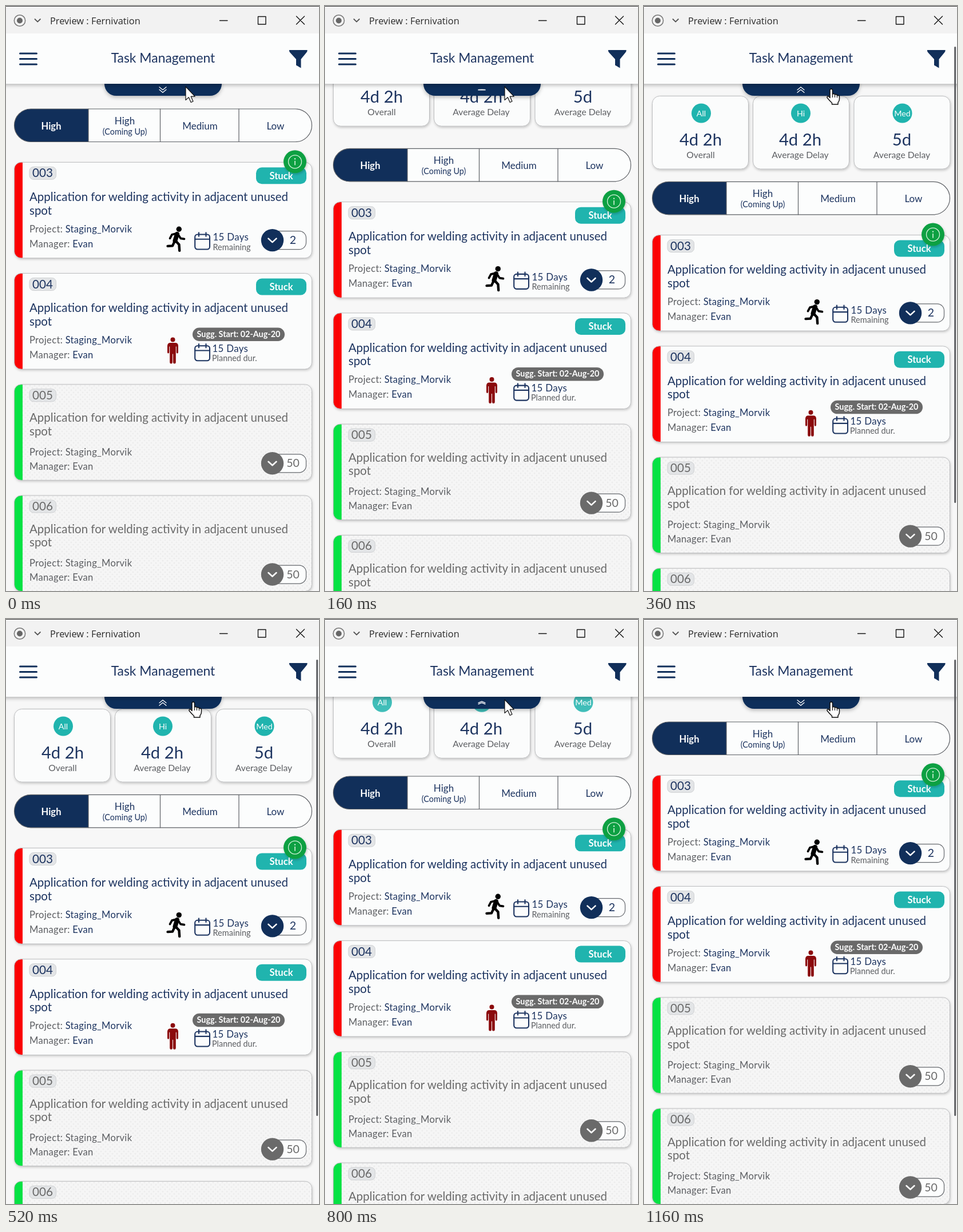
These frames come from a looping animation (547x1023 px, 1200 ms). An HTML page:

```html
<!DOCTYPE html>
<html lang="en">
<head>
<meta charset="utf-8">
<title>Task Management</title>
<style>
  html, body { margin: 0; width: 100%; height: 100%; overflow: hidden; background: #f7f7f7; }
  svg { display: block; width: 100%; height: 100%; }
  text { font-family: Lato, Carlito, sans-serif; }
  .m { text-anchor: middle; }
  .b { font-weight: 700; }
  .s { letter-spacing: .3px; }
  .line { fill: none; stroke-linecap: round; stroke-linejoin: round; }
</style>
</head>
<body>
<svg id="stage" viewBox="0 0 547 1023" xmlns="http://www.w3.org/2000/svg"></svg>
<script>
const NAVY = '#112f5a', INK = '#1d3460', GREY = '#6a6a6a', LABEL = '#5c5e62', TEAL = '#20b4ae';
const PAPER = '#fbfcfc', EDGE = '#bcbdbf';
const LOOP = 1200, STEP = 40;
const OPEN = [0, 306], CLOSE = [628, 1111];
const SHIFT = 127.3, PANEL = 164.5;

const text = (x, y, size, fill, str, cls = '') =>
  `<text x="${x}" y="${y}" font-size="${size}" fill="${fill}" class="${cls}">${str}</text>`;
const box = (x, y, w, h, r, attrs) =>
  `<rect x="${x}" y="${y}" width="${w}" height="${h}" rx="${r}" ${attrs}/>`;
const line = (d, color, width, extra = '') =>
  `<path d="${d}" class="line" stroke="${color}" stroke-width="${width}" ${extra}/>`;
const group = (x, y, body, id = '') =>
  `<g ${id && `id="${id}"`} transform="translate(${x} ${y})">${body}</g>`;

const defs = `<defs>
  <filter id="soft" x="-10%" y="-20%" width="120%" height="150%">
    <feDropShadow dx="1" dy="2" stdDeviation="2" flood-color="#000" flood-opacity=".22"/>
  </filter>
  <filter id="wide" x="-10%" y="-20%" width="120%" height="160%">
    <feDropShadow dx="0" dy="3" stdDeviation="3" flood-color="#000" flood-opacity=".24"/>
  </filter>
  <pattern id="dots" width="8" height="8" patternUnits="userSpaceOnUse">
    <rect width="8" height="8" fill="#f6f6f6"/>
    <circle cx="2" cy="2" r="1.5" fill="#ececec"/><circle cx="6" cy="6" r="1.5" fill="#ececec"/>
  </pattern>
</defs>`;

function windowBar() {
  return box(0, 0, 547, 48, 0, 'fill="#f2f2f2"') + box(0, 0, 547, 1, 0, 'fill="#3a3a3a"') +
    '<circle cx="24" cy="25.5" r="9.7" fill="none" stroke="#777" stroke-width="1.5"/>' +
    '<circle cx="24" cy="25.5" r="5" fill="#666"/>' +
    line('M50.5 23l4.7 4.7 4.7-4.7', '#555', 1.8) +
    `<text x="77" y="31.5" font-size="16.4" fill="#2a2a2a" style="font-family:'Open Sans',sans-serif">Preview : Fernivation</text>` +
    line('M373.5 25.5h13.5M440.5 18.5h13.5v13.5h-13.5zM507.5 18l14 14M521.5 18l-14 14', '#151515', 1.4);
}

function header() {
  return box(-10, 40, 567, 96, 0, 'fill="#fcfdfd" filter="url(#wide)"') +
    line('M24.5 83h29M24.5 92.5h29M24.5 102h29', NAVY, 3) +
    text(274.5, 99, 22.9, INK, 'Task Management', 'm') +
    `<path d="M495 77h31.500q.500 2.500-1.500 4.500L515.500 93v15.500l-8.500-5V93L496.500 81.500q-2-2-1.500-4.500z" fill="${NAVY}"/>`;
}

function tab() {
  return `<path d="M172 130H377V136.500A20.500 20.500 0 0 1 356.500 157H192.500A20.500 20.500 0 0 1 172 136.500Z" fill="${NAVY}" filter="url(#wide)"/>` +
    '<path id="chevrons" class="line" stroke="#fff" stroke-width="1.3"/>';
}

function stat(x, cx, badge, value, label) {
  return box(x, 157.5, 168, 127.5, 13, `fill="${PAPER}" stroke="${EDGE}" filter="url(#soft)"`) +
    `<g class="badge"><circle cx="${cx}" cy="187.500" r="17" fill="${TEAL}"/>` +
    text(cx, 192.5, 14.3, '#fff', badge, 'm') + '</g>' +
    text(cx - 1, 243.5, 29.3, INK, value, 'm') +
    text(cx - 1, 265.5, 15.7, LABEL, label, 'm');
}

function segments() {
  return box(14.5, 180, 520, 57.5, 28.7, 'fill="#fcfdfd"') +
    `<path d="M144 180H43.200a28.700 28.700 0 0 0 0 57.500H144z" fill="${NAVY}"/>` +
    box(14.5, 180, 520, 57.5, 28.7, 'fill="none" stroke="#5d6065" stroke-width="1.2"') +
    line('M144 180v57.5M269.5 180v57.5M407 180v57.5', '#5d6065', 1.2) +
    text(79, 216, 16.6, '#fff', 'High', 'm b') +
    text(207.5, 207, 17, INK, 'High', 'm') +
    text(207.5, 224.5, 14.4, INK, '(Coming Up)', 'm') +
    text(339, 216, 17, INK, 'Medium', 'm') +
    text(471, 216, 17, INK, 'Low', 'm');
}

const calendar = y => group(329, y,
  box(1.2, 4.2, 25.8, 26, 4.5, `fill="none" stroke="${INK}" stroke-width="2.1"`) +
  line('M1.500 12.500h25M8 1v6.500M20.500 1v6.500', INK, 2.1));

const runner = group(280, 112,
  '<circle cx="22.300" cy="5" r="4.700"/>' +
  line('M19 13.500L15.500 25', '#000', 8) +
  line('M18 12.500L10 14.500 6.500 21M21 14.500l4 6.500 6.500 1', '#000', 3.7) +
  line('M17 26l5.500 6 .7 10.500', '#000', 4.4) +
  line('M14.500 26.500L11 34 2.500 34.500', '#000', 4.3));

const person = group(281, 112,
  '<g fill="#8b0a0c"><circle cx="10.500" cy="4" r="4"/>' +
  '<path d="M6 9.500H15Q19.500 9.500 20 14.500V26Q20 28 18.400 28T16.800 26V16H15.800V43.500Q15.800 46 13.400 46T11 43.500V29H10V43.500Q10 46 7.600 46T5.200 43.500V16H4.200V26Q4.200 28 2.600 28T1 26V14.500Q1.500 9.500 6 9.500Z"/></g>');

function counter(y, n, color) {
  return box(455, y - 16, 69.5, 32, 12, 'fill="#fcfdfd" stroke="#66696e" stroke-width="1.2"') +
    `<circle cx="465.500" cy="${y}" r="19.700" fill="${color}"/>` +
    line(`M458.500 ${y - 3}l7 6.500 7-6.500`, '#fff', 2.6) +
    text(501.5, y + 6.5, 19.5, color === GREY ? GREY : INK, n, 'm');
}

const stuck = box(437, 9, 88, 29, 10, `fill="${TEAL}"`) + text(481, 29.5, 16.6, '#fff', 'Stuck', 'm b');

const info = '<circle cx="505" cy="-1" r="20" fill="#0fa043" filter="url(#soft)"/>' +
  '<circle cx="505" cy="-1" r="11.500" fill="none" stroke="#d5f3dc" stroke-width="1.300"/>' +
  line('M505 -2v6.500', '#d5f3dc', 1.6) + '<circle cx="505" cy="-6" r="1.200" fill="#d5f3dc"/>';

function card(i, extra) {
  const live = i < 2, ink = live ? INK : GREY, up = live ? 0 : 2.3;
  const pair = (y, label, value) =>
    text(41, y, 16.6, LABEL, `${label}: <tspan fill="${live ? INK : LABEL}">${value}</tspan>`, 's');
  return group(0, 273.3 + i * 194.25,
    box(14.5, 0, 520, 167.5, 12, `fill="${live ? PAPER : 'url(#dots)'}" filter="url(#soft)"`) +
    `<path d="M29 0H26.500A12 12 0 0 0 14.500 12V155.500A12 12 0 0 0 26.500 167.500H29Z" fill="${live ? '#fb0203' : '#05e244'}"/>` +
    box(14.5, 0, 520, 167.5, 12, `fill="none" stroke="${EDGE}"`) +
    box(41, 8, 46.5, 22, 7, 'fill="#e3e5e7" stroke="#cfd1d3"') +
    text(64, 26, 20.7, ink, '00' + (i + 3), 'm') +
    text(41, 67.8 - up, 20.5, ink, 'Application for welding activity in adjacent unused') +
    text(41, 91.5 - up, 20.5, ink, 'spot') +
    pair(live ? 122.5 : 124, 'Project', 'Staging_Morvik') +
    pair(live ? 148.5 : 149, 'Manager', 'Evan') + extra);
}

function cards() {
  return card(0, stuck + info + runner + calendar(122) +
      text(361.5, 137, 16.9, INK, '15 Days', 's') + text(361.5, 153.3, 14.5, LABEL, 'Remaining') +
      counter(136.3, '2', NAVY)) +
    card(1, stuck + person + calendar(122.5) +
      box(326, 95, 161, 23.5, 11.7, `fill="${GREY}"`) +
      text(406.5, 111.5, 14.4, '#fff', 'Sugg. Start: 02-Aug-20', 'm b') +
      text(360.5, 137, 16.9, INK, '15 Days', 's') + text(360, 153.3, 14.4, LABEL, 'Planned dur.')) +
    card(2, counter(138, '50', GREY)) +
    card(3, counter(138, '50', GREY));
}

const arrow = group(314, 141,
  '<path d="M0 0V23.500L5.300 18.600 9.200 27.500 13 25.800 9.200 17.200H16.200Z" fill="#fff" stroke="#111" stroke-width="1.200" stroke-linejoin="round"/>', 'arrow');

const hand = group(319, 144,
  '<path d="M6 16.500V3.500Q6 1 8.200 1T10.500 3.500V10Q13.500 8.500 14.500 11 17.500 9.800 18.500 12.300 22.500 11.500 22.500 15.500V19Q22.500 22 20 25V28H9.500V25.500Q6 22.500 1.200 16.500 .5 14 3 13.500 4.700 14.500 6 16.500Z" fill="#fff" stroke="#111" stroke-width="1.500" stroke-linejoin="round"/>' +
  line('M10.500 10v5.500M14.500 11v4.500M18.500 12.300v3.500', '#111', 1.2), 'hand');

const stage = document.getElementById('stage');
stage.innerHTML = defs + box(0, 0, 547, 1023, 0, 'fill="#f7f7f7"') +
  group(0, 0, segments() + cards(), 'list') +
  group(0, 0, stat(14.5, 100, 'All', '4d 2h', 'Overall') +
    stat(190.5, 274, 'Hi', '4d 2h', 'Average Delay') +
    stat(367, 451.5, 'Med', '5d', 'Average Delay'), 'stats') +
  tab() + header() + windowBar() +
  box(542.2, 71, 3, 798, 1.5, 'id="scroll" fill="#5a5c5f"') + arrow + hand;

const [list, stats, chevrons, scroll, arrowEl, handEl] =
  ['list', 'stats', 'chevrons', 'scroll', 'arrow', 'hand'].map(id => document.getElementById(id));
const badges = document.querySelectorAll('.badge');

const ease = x => x < .5 ? 2 * x * x : 1 - 2 * (1 - x) ** 2;
const ramp = (t, [from, to]) => ease(Math.min(1, Math.max(0, (t - from) / (to - from))));
const within = (t, [from, to]) => t >= from && t < to;
const show = (el, on) => el.setAttribute('visibility', on ? 'visible' : 'hidden');

function draw(t) {
  const p = ramp(t, OPEN) - ramp(t, CLOSE);
  list.setAttribute('transform', `translate(0 ${SHIFT * p})`);
  stats.setAttribute('transform', `translate(0 ${-PANEL * (1 - p)})`);
  badges.forEach(el => el.setAttribute('opacity', .4 + .6 * p));

  // The double chevron flips through a flat line.
  const k = 1 - 2 * p;
  const vee = y => `M268 ${146.5 + y * k}L274 ${146.5 + (y + 5) * k}L280 ${146.5 + y * k}`;
  chevrons.setAttribute('d', vee(-4.8) + vee(-.2));

  const moving = within(t, OPEN) || within(t, CLOSE);
  show(scroll, !moving);
  show(handEl, !moving);
  show(arrowEl, moving);
}

const start = performance.now();
function tick() {
  const t = (performance.now() - start) % LOOP;
  draw(Math.floor(t / STEP) * STEP);
  requestAnimationFrame(tick);
}
draw(0);
requestAnimationFrame(tick);
</script>
</body>
</html>
```
